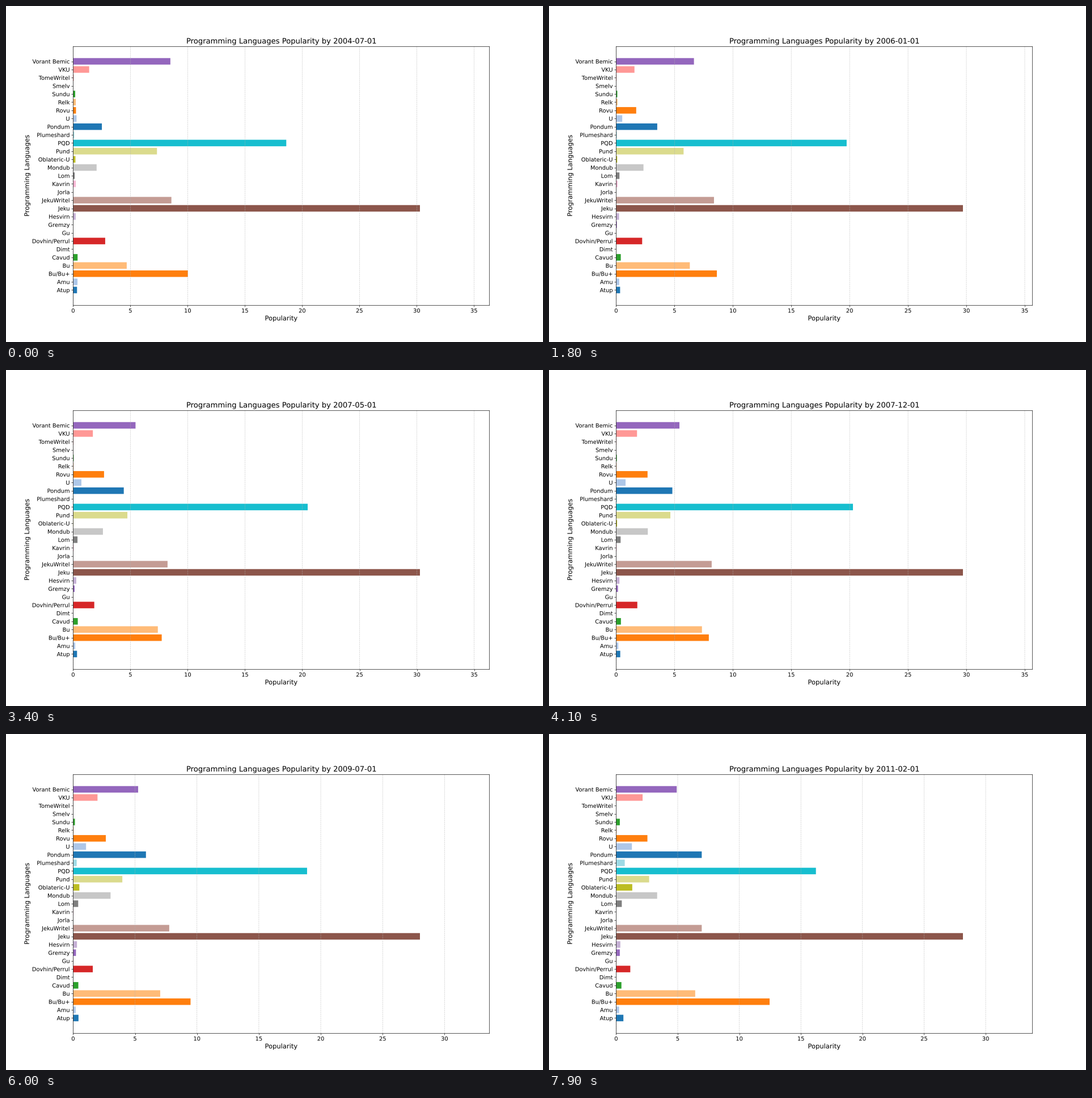
A matplotlib script for the animation above (8000 ms loop, 947 by 592 pixels).

```python
import numpy as np
import matplotlib.pyplot as plt
from matplotlib import patheffects
from matplotlib.animation import FuncAnimation

W, H = 947, 592
DPI = W / 16
FRAMES, INTERVAL = 80, 100
TURN = 30
month = np.arange(FRAMES)

# Path effects draw text as outlines, placed without pixel rounding.
plt.rcParams.update({"font.family": "DejaVu Sans", "text.hinting": "none",
                     "path.effects": [patheffects.Normal()]})


def steady(start, end):
    """Straight drift over the whole span."""
    return np.linspace(start, end, FRAMES)


def turning(start, turn, end):
    """Straight drift to the turning month, then ease in to the end."""
    ease = np.clip((month - TURN) / (FRAMES - 1 - TURN), 0, 1) ** 2
    return np.interp(month, (0, TURN), (start, turn)) + (end - turn) * ease


def leader():
    """Yearly ripple on a level that drops once."""
    level = np.interp(month, (52, 55), (29.98, 27.95))
    return level + .3 * np.cos(2 * np.pi * month / 11.5)


# Bottom to top.
SERIES = {
    "Atup": turning(.34, .34, .59),
    "Amu": turning(.38, .18, .24),
    "Bu/Bu+": turning(10.02, 7.7, 12.46),
    "Bu": turning(4.68, 7.4, 6.42),
    "Cavud": steady(.39, .43),
    "Dimt": steady(0, 0),
    "Dovhin/Perrul": turning(2.8, 1.85, 1.15),
    "Gu": steady(0, .03),
    "Gremzy": steady(0, .3),
    "Hesvirn": steady(.22, .34),
    "Jeku": leader(),
    "JekuWritel": turning(8.58, 8.25, 6.95),
    "Jorla": steady(0, 0),
    "Kavrin": turning(.23, .05, 0),
    "Lom": turning(.14, .38, .46),
    "Mondub": steady(2.05, 3.33),
    "Oblateric-U": turning(.2, .02, 1.31),
    "Pund": turning(7.32, 4.75, 2.68),
    "PQD": turning(18.61, 20.5, 16.22),
    "Plumeshard": turning(.1, .04, .7),
    "Pondum": steady(2.51, 6.95),
    "U": steady(.3, 1.28),
    "Rovu": turning(.25, 2.7, 2.54),
    "Relk": turning(.23, .04, .04),
    "Sundu": turning(.18, .05, .3),
    "Smelv": steady(0, 0),
    "TomeWritel": steady(.04, 0),
    "VKU": steady(1.4, 2.15),
    "Vorant Bemic": turning(8.49, 5.45, 4.92),
}
names = list(SERIES)
data = np.array(list(SERIES.values()))

fig, ax = plt.subplots(figsize=(16, H / DPI), dpi=DPI)
fig.subplots_adjust(left=.125, right=.9, bottom=.11, top=.88)

colors = [plt.cm.tab20(i % 20) for i in range(len(names))]
bars = ax.barh(names, data[:, 0], color=colors, snap=False)
ax.grid(axis="x", linestyle="--", alpha=.7, snap=False)
ax.tick_params(labelsize=12)
ax.set_xlabel("Popularity", fontsize=14)
ax.set_ylabel("Programming Languages", fontsize=14)
ax.yaxis.set_label_coords(-.1026, .5)
title = ax.set_title("", fontsize=16)


def update(frame):
    values = data[:, frame]
    for bar, value in zip(bars, values):
        bar.set_width(value)
    ax.set_xlim(0, values.max() * 1.2)
    years, m = divmod(frame + 6, 12)
    title.set_text("Programming Languages Popularity by "
                   f"{2004 + years}-{m + 1:02d}-01")
    return [*bars, title]


anim = FuncAnimation(fig, update, frames=FRAMES, interval=INTERVAL,
                     init_func=lambda: update(0), repeat=True, repeat_delay=0)
plt.show()
```
